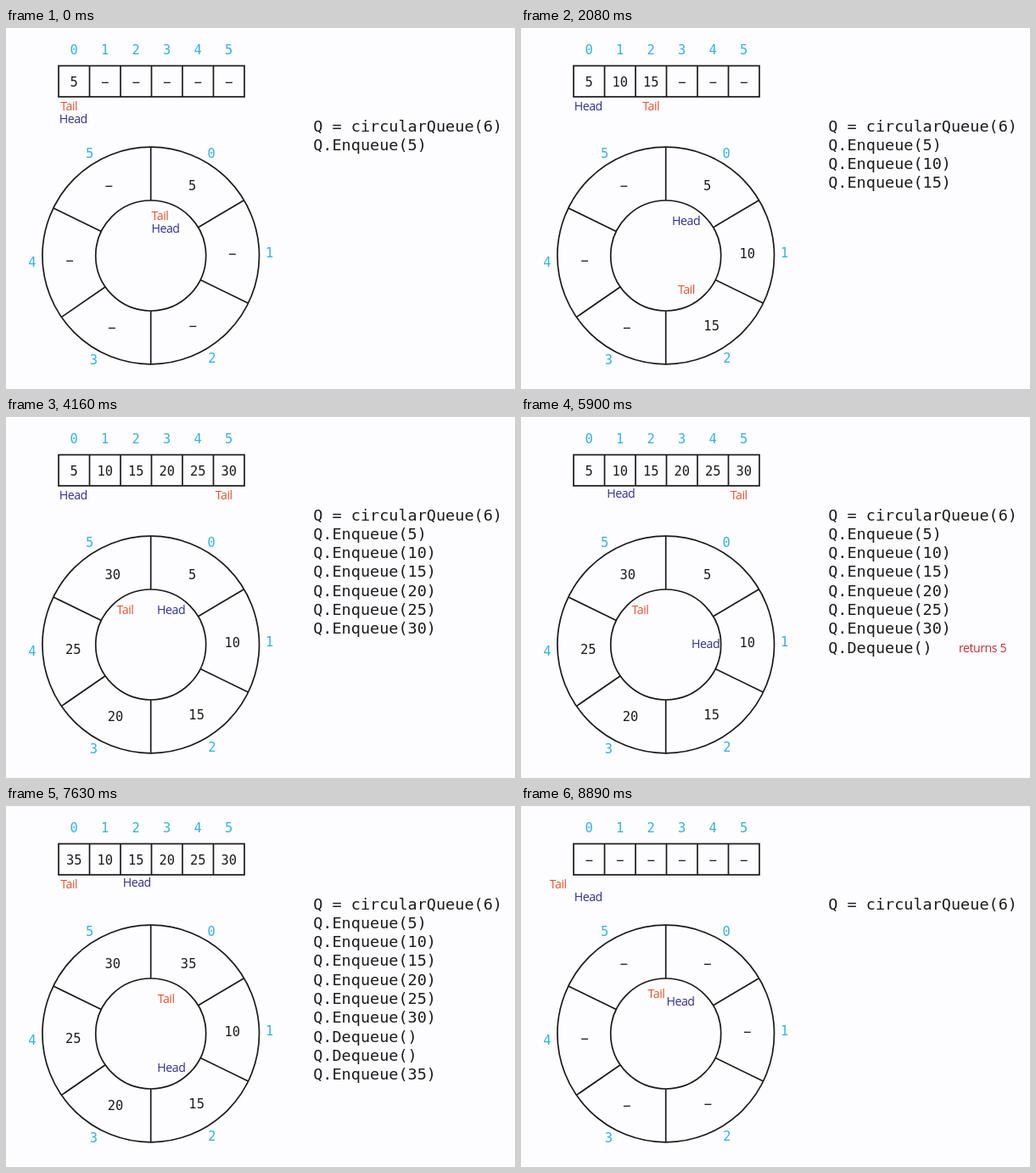
Recreate the animation shown at these times as an HTML page. Size 600 by 425 pixels, loop 9230 ms.

```html
<!DOCTYPE html>
<html lang="en">
<head>
<meta charset="utf-8">
<title>Circular queue</title>
<style>
  html, body { margin: 0; width: 100%; height: 100%; overflow: hidden; background: #fdfcfe; }
  svg { display: block; width: 600px; height: 425px; }
  .line { fill: none; stroke: #1a1a1a; stroke-width: 1.7; }
  text { text-anchor: middle; }
  .num, .idx { font: 15.4px "DejaVu Sans Mono", monospace; fill: #1c1c1c; }
  .idx { fill: #35b1e1; }
  .code { font: 18.5px "DejaVu Sans Mono", monospace; fill: #1c1c1c; text-anchor: start; white-space: pre; }
  .tail, .head, .ret { font: 14.2px "Open Sans", "Noto Sans", sans-serif; letter-spacing: -.45px; }
  .tail { fill: #dd5632; }
  .head { fill: #312e8e; }
  .ret { fill: #bd2f30; }
</style>
</head>
<body>
<svg id="stage" viewBox="0 0 600 425"></svg>
<script>
const LOOP = 9230, RESET = 8540, RETURN_MS = 760;
const STARTS = [0, 690, 1380, 2390, 3080, 3780, 5160, 6120, 7500];
const SIZE = 6, LEFT = 62, CELL = 36.5;
const CX = 170.7, CY = 268, INNER = 65, OUTER = 127.8;
const SPOKES = [0, 59.3, 116, 180, 235.5, 296, 360];
const LINE_Y = 114.8, LINE_STEP = 22.3;

const enqueue = n => `Q.Enqueue(${n})`;
const CODE = ['Q = circularQueue(6)',
  ...Array.from({ length: SIZE }, (_, i) => enqueue(5 * (i + 1))),
  'Q.Dequeue()', 'Q.Dequeue()', enqueue(35)];

const stage = document.getElementById('stage');

function add(tag, attrs) {
  const el = document.createElementNS('http://www.w3.org/2000/svg', tag);
  for (const key in attrs) el.setAttribute(key, attrs[key]);
  return stage.appendChild(el);
}

function label(cls, content = '', x = 0, y = 0) {
  const el = add('text', { class: cls, 'dominant-baseline': 'auto' });
  el.textContent = content;
  place(el, x, y);
  return el;
}

// y is the middle of the capitals
function place(el, x, y) {
  const drop = el.classList.contains('code') ? 6.7 : el.matches('.num, .idx') ? 5.5 : 4.7;
  el.setAttribute('x', x);
  el.setAttribute('y', y + drop);
}

function polar(deg, r) {
  const a = deg * Math.PI / 180;
  return [CX + r * Math.sin(a), CY - r * Math.cos(a)];
}
const inCell = (i, r) => polar((SPOKES[i] + SPOKES[i + 1]) / 2 + 1, r);
const slotX = i => LEFT + CELL * (i + .5);

// Array and ring outlines
add('rect', { class: 'line', x: LEFT, y: 44.5, width: SIZE * CELL, height: CELL });
for (const r of [INNER, OUTER]) add('circle', { class: 'line', cx: CX, cy: CY, r });

const cells = [];
for (let i = 0; i < SIZE; i++) {
  if (i) add('path', { class: 'line', d: `M${LEFT + CELL * i} 44.5v${CELL}` });
  add('path', { class: 'line', d: `M${polar(SPOKES[i], INNER)}L${polar(SPOKES[i], OUTER)}` });
  label('idx', i, slotX(i), 25.5);
  label('idx', i, ...inCell(i, 140));
  cells.push([label('num', '', slotX(i), 63), label('num')]);
}
const lines = CODE.map((s, i) => label('code', s, 362.2, LINE_Y + LINE_STEP * i));
const [tailA, tailR] = [label('tail', 'Tail'), label('tail', 'Tail')];
const [headA, headR] = [label('head', 'Head'), label('head', 'Head')];
const ret = label('ret');

function valueAt(i, stored) {
  const lap = i + SIZE < stored ? SIZE : 0;
  return i < stored ? String(5 * (i + lap + 1)) : '\u2212';
}

function movePointers(stored, head) {
  const stacked = stored < 2;
  const slot = stored ? (stored - 1) % SIZE : -1;
  const end = slot % (SIZE - 1) ? 0 : -6;
  const [tx, ty] = inCell(Math.max(slot, 0), 47);
  const [hx, hy] = inCell(head, 47);
  place(tailA, slotX(slot) + end, 92);
  place(headA, slotX(head) + (head ? 1 : -1), stacked ? 107 : head ? 90 : 92);
  if (stacked) {
    place(tailR, stored ? 181.5 : 159.5, 221);
    place(headR, 188, 230 + 6 * stored);
  } else {
    place(tailR, tx + end, ty);
    place(headR, hx, hy);
  }
}

function show(shown, returning) {
  const run = CODE.slice(0, shown);
  const stored = run.filter(s => s.includes('Enq')).length;
  const head = run.filter(s => s.includes('Deq')).length;
  cells.forEach(([box, arc], i) => {
    const value = valueAt(i, stored);
    const [x, y] = inCell(i, 96);
    box.textContent = arc.textContent = value;
    place(arc, x + (value.length - 1) * 4.5 * Math.min(i - 1, 1), y);
  });
  lines.forEach((el, i) => el.setAttribute('visibility', i < shown ? 'visible' : 'hidden'));
  movePointers(stored, head);
  ret.textContent = returning ? `returns ${5 * head}` : '';
  place(ret, 544, LINE_Y + LINE_STEP * (shown - 1) + 1);
}

let last;
const begin = performance.now();
function tick() {
  const t = (performance.now() - begin) % LOOP;
  const done = STARTS.filter(s => s <= t).length;
  const shown = t < RESET ? done + 1 : 1;
  const returning = CODE[shown - 1].includes('Deq') && t - STARTS[done - 1] < RETURN_MS;
  const key = `${shown} ${returning}`;
  if (key !== last) show(shown, returning);
  last = key;
  requestAnimationFrame(tick);
}
tick();
</script>
</body>
</html>
```
